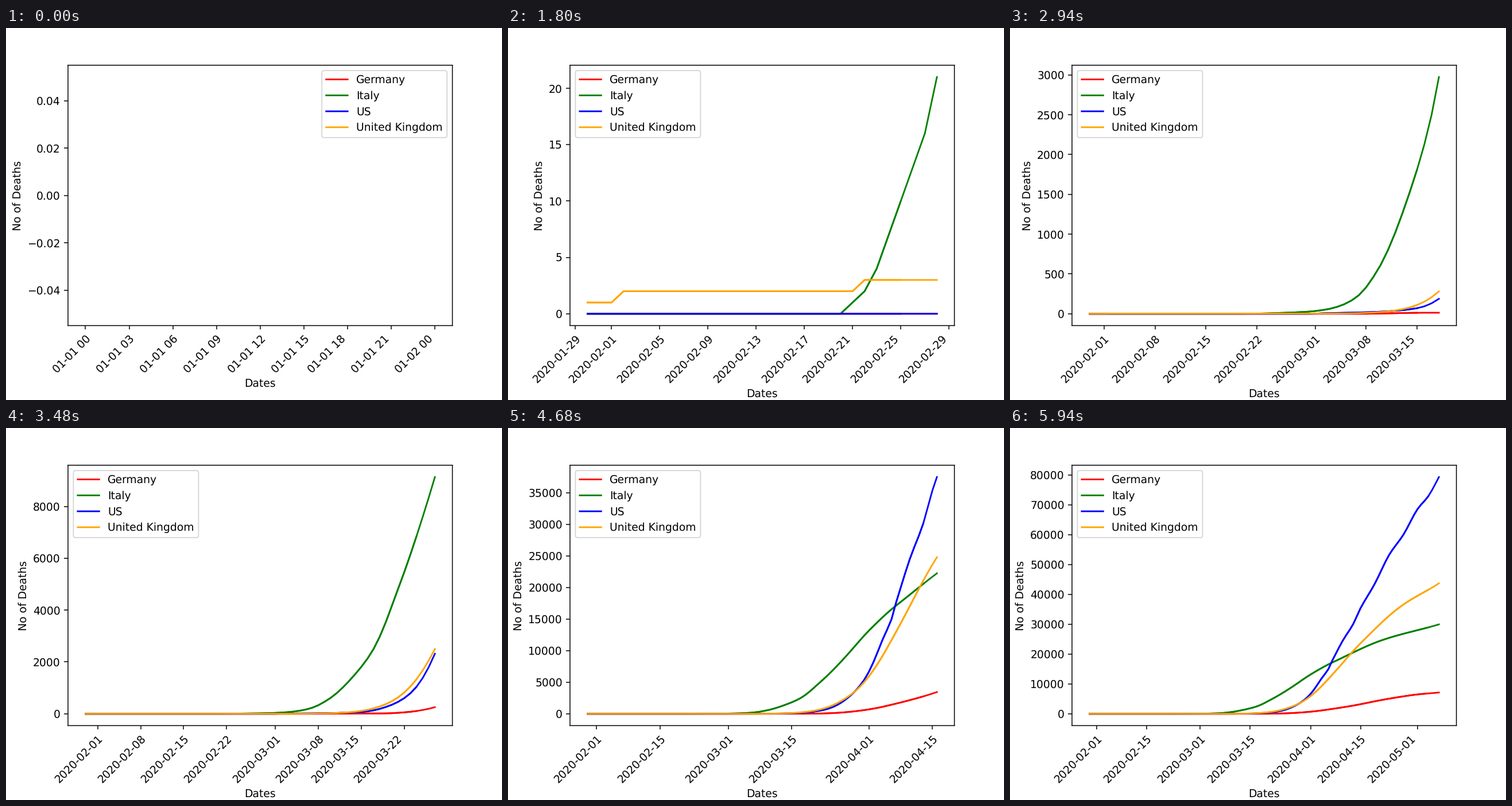
Write a matplotlib script that moves like this. It is 864x648 px and loops after 6000 ms.

```python
import numpy as np
import matplotlib.pyplot as plt
from matplotlib.animation import FuncAnimation

FRAMES = 100
LAGS = [3, 0]  # an older trace below the new one firms up all but its tip

DAYS = np.datetime64("2020-01-30") + np.arange(FRAMES)

# Turning points of each curve: (day, total)
CURVES = {
    "Germany": ("red", [
        (38, 0), (39, 2), (46, 13), (48, 13), (52, 55), (57, 253),
        (61, 583), (68, 1607), (75, 2969), (81, 4404), (87, 5640),
        (92, 6481), (98, 7119)]),
    "Italy": ("green", [
        (21, 0), (22, 1), (25, 7), (31, 34), (37, 233), (39, 463),
        (43, 1266), (47, 2503), (51, 4825), (57, 9134), (62, 13155),
        (68, 17127), (82, 24648), (98, 29958)]),
    "US": ("blue", [
        (29, 0), (31, 1), (32, 6), (39, 22), (45, 70), (49, 262),
        (53, 790), (57, 2318), (61, 5400), (65, 11700), (67, 14980),
        (68, 17609), (71, 24450), (74, 30150), (76, 35350), (80, 43560),
        (84, 53180), (88, 59950), (92, 68600), (95, 72880), (98, 79338)]),
    "United Kingdom": ("orange", [
        (2, 1), (3, 2), (22, 2), (23, 3), (33, 3), (39, 16), (49, 372),
        (57, 2500), (68, 12970), (76, 23600), (87, 35720), (98, 43730)]),
}


def grow(points):
    """Daily totals along a monotone cubic through the points, on a log scale."""
    x, total = np.array(points, float).T
    y = np.log1p(total)
    step = np.diff(x)
    rate = np.diff(y) / step
    pair = rate[:-1] + rate[1:]
    inner = 2 * rate[:-1] * rate[1:] / np.where(pair > 0, pair, 1)
    slope = np.r_[rate[0], inner, rate[-1]]

    day = np.clip(np.arange(FRAMES), x[0], x[-1])
    k = np.clip(np.searchsorted(x, day, side="right") - 1, 0, len(step) - 1)
    t = (day - x[k]) / step[k]
    blend = t * t * (3 - 2 * t)
    bend = t * (1 - t) * ((1 - t) * slope[k] - t * slope[k + 1])
    return np.round(np.expm1(y[k] + blend * (y[k + 1] - y[k]) + step[k] * bend))


totals = [grow(points) for _, points in CURVES.values()]

# Soft subpixel edges for strokes and letters
plt.rcParams.update({"text.hinting": "no_hinting", "path.snap": False})

fig, ax = plt.subplots(figsize=(6.4, 4.8), dpi=135)
fig.subplots_adjust(left=0.125, right=0.9, bottom=0.2, top=0.9)
plt.xticks(rotation=45, ha="right", rotation_mode="anchor")
ax.set_xlabel("Dates")
ax.set_ylabel("No of Deaths")

layers = [
    [ax.plot(DAYS[:0], [], color=color)[0] for color, _ in CURVES.values()]
    for _ in LAGS
]
ax.legend(layers[0], list(CURVES), loc="best")


def update(i):
    for lag, lines in zip(LAGS, layers):
        n = max(i - lag, 0)
        for line, values in zip(lines, totals):
            line.set_data(DAYS[:n], values[:n])
    ax.relim()
    ax.autoscale_view()
    return ax.lines


anim = FuncAnimation(fig, update, frames=FRAMES, interval=60,
                     repeat=True, repeat_delay=0)
plt.show()
```
